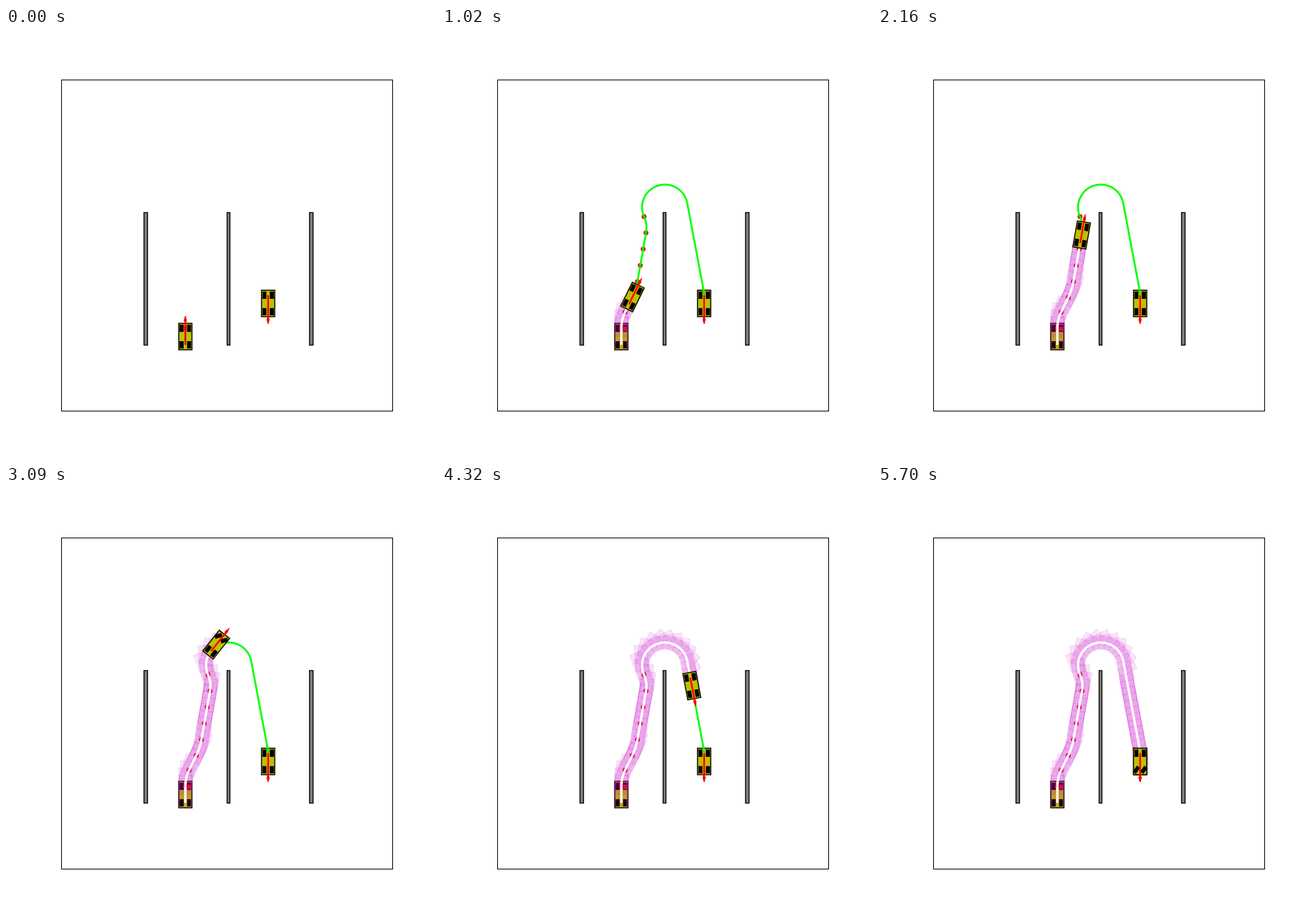
An HTML page with a canvas for the animation above (5.76 s loop, 600 px wide and 600 px high).

```html
<!DOCTYPE html>
<html lang="en">
<head>
<meta charset="utf-8">
<title>Parking path planner</title>
<style>
  html, body { margin: 0; width: 100%; height: 100%; overflow: hidden; background: #fff; }
  canvas { display: block; width: 600px; height: 600px; }
</style>
</head>
<body>
<canvas id="stage" width="600" height="600"></canvas>
<script>
const ctx = document.getElementById('stage').getContext('2d');
const UNIT = 23.1, STEP_MS = 30, LOOP_MS = 5760, LAST = 190, DEPART = 9, GHOST_GAP = 4;
const RADIUS = UNIT / Math.tan(Math.PI / 5);
const rad = d => d * Math.PI / 180;
const place = (x, y, h) => ({ x: 77 + UNIT * x, y: 534.5 - UNIT * y, h });

const start = place(7.5, 4, 0);
const goal = place(12.5, 7, Math.PI);

// Headings run clockwise from straight up; k is curvature, positive to the right.
function advance(p, len, k) {
  const h = p.h + k * len;
  if (!k) return { x: p.x + len * Math.sin(h), y: p.y - len * Math.cos(h), h };
  return {
    x: p.x + (Math.cos(p.h) - Math.cos(h)) / k,
    y: p.y - (Math.sin(h) - Math.sin(p.h)) / k,
    h
  };
}

const segments = [];
let end = start, total = 0;
function addSegment(len, k) {
  segments.push({ from: end, at: total, len, k });
  end = advance(end, len, k);
  total += len;
}

// Searched part: unit steps, each with a turn in degrees.
const nodes = [0, 26, 0, -16, 0, 0, 0, -34].map(turn => {
  addSegment(UNIT, rad(turn) / UNIT);
  return end;
});
nodes.splice(1, 0, advance(start, UNIT, rad(26) / UNIT));

// Closing part: right arc, straight, right arc.
const centre = p => ({ x: p.x + RADIUS * Math.cos(p.h), y: p.y + RADIUS * Math.sin(p.h) });
const c1 = centre(end), c2 = centre(goal);
const dx = c2.x - c1.x, dy = c2.y - c1.y;
const heading = Math.atan2(dx, -dy);
addSegment(RADIUS * (heading - end.h), 1 / RADIUS);
addSegment(Math.hypot(dx, dy), 0);
addSegment(RADIUS * (Math.PI - heading), 1 / RADIUS);

function poseAt(s) {
  const seg = segments.findLast(g => g.at <= s) || segments[0];
  const p = advance(seg.from, Math.min(s - seg.at, seg.len), seg.k);
  p.steer = Math.atan(seg.k * UNIT);
  return p;
}

const distanceAt = frame => total * (frame - DEPART) / (LAST - DEPART);

function tracePath(from, to, color, width) {
  if (to <= from) return;
  ctx.beginPath();
  for (let s = from; s < to; s++) {
    const p = poseAt(s);
    ctx.lineTo(p.x, p.y);
  }
  const p = poseAt(to);
  ctx.lineTo(p.x, p.y);
  ctx.strokeStyle = color;
  ctx.lineWidth = width;
  ctx.stroke();
}

function atPose(p, draw) {
  ctx.save();
  ctx.translate(p.x, p.y);
  ctx.rotate(p.h);
  draw();
  ctx.restore();
}

function box(x, y, w, h, fill, stroke, width) {
  ctx.fillStyle = fill;
  ctx.strokeStyle = stroke;
  ctx.lineWidth = width;
  ctx.fillRect(x, y, w, h);
  ctx.strokeRect(x, y, w, h);
}

function body(fill, stroke, width) {
  box(-0.4 * UNIT, -1.3 * UNIT, 0.8 * UNIT, 1.6 * UNIT, fill, stroke, width);
}

function wheel(x, y, turn) {
  ctx.save();
  ctx.translate(x, y);
  ctx.rotate(turn);
  box(-2.3, -4.6, 4.6, 9.2, '#000', '#000', 1);
  ctx.restore();
}

function arrow() {
  ctx.strokeStyle = ctx.fillStyle = '#f00';
  ctx.lineWidth = 2.4;
  ctx.beginPath();
  ctx.moveTo(0, 0);
  ctx.lineTo(0, -34.6);
  ctx.stroke();
  ctx.lineWidth = 1;
  ctx.beginPath();
  ctx.moveTo(-1.7, -34.2);
  ctx.lineTo(0, -40.2);
  ctx.lineTo(1.7, -34.2);
  ctx.lineTo(0, -30);
  ctx.closePath();
  ctx.fill();
  ctx.stroke();
}

function car(p, withArrow) {
  atPose(p, () => {
    body('#bfbf00', '#000', 1.4);
    for (const x of [-5.2, 5.2]) {
      wheel(x, 0, 0);
      wheel(x, -UNIT, p.steer || 0);
    }
    if (withArrow) arrow();
  });
}

function dot(p) {
  ctx.fillStyle = '#e01010';
  ctx.beginPath();
  ctx.arc(p.x, p.y, 3.4, 0, 2 * Math.PI);
  ctx.fill();
}

function scene() {
  ctx.fillStyle = '#fff';
  ctx.fillRect(0, 0, 600, 600);
  ctx.strokeStyle = '#000';
  ctx.lineWidth = 1;
  ctx.strokeRect(77.5, 72.5, 462, 462);
  for (const [x, w] of [[192.5, 5], [308.5, 4], [423.5, 5]]) {
    box(x, 257.5, w, 185, '#808080', '#000', 1.3);
  }
}

function ghosts(frame) {
  ctx.globalAlpha = 0.1;
  for (let f = DEPART; f < frame; f += GHOST_GAP) {
    atPose(poseAt(distanceAt(f)), () => body('#bf00bf', '#bf00bf', 1.4));
  }
  ctx.globalAlpha = 1;
}

function render(frame) {
  const searching = frame < DEPART;
  const s = searching ? 0 : distanceAt(frame);
  const found = nodes.slice(0, frame + 1);
  scene();
  car(start, searching);
  car(goal, true);
  if (searching) {
    const reach = Math.max(1, found.length - 1) * UNIT;
    tracePath(0, reach, 'rgba(150,0,80,.6)', 1.4);
  }
  found.forEach(dot);
  if (searching) return;
  tracePath(s, total, '#0f0', 2.6);
  ghosts(frame);
  tracePath(0, s, '#fff', 3.2);
  car(poseAt(s), true);
}

const begin = performance.now();
let shown = -1;
function tick() {
  const t = Math.max(0, performance.now() - begin) % LOOP_MS;
  const frame = Math.min(LAST, Math.floor(t / STEP_MS));
  if (frame !== shown) render(shown = frame);
  requestAnimationFrame(tick);
}
tick();
</script>
</body>
</html>
```
